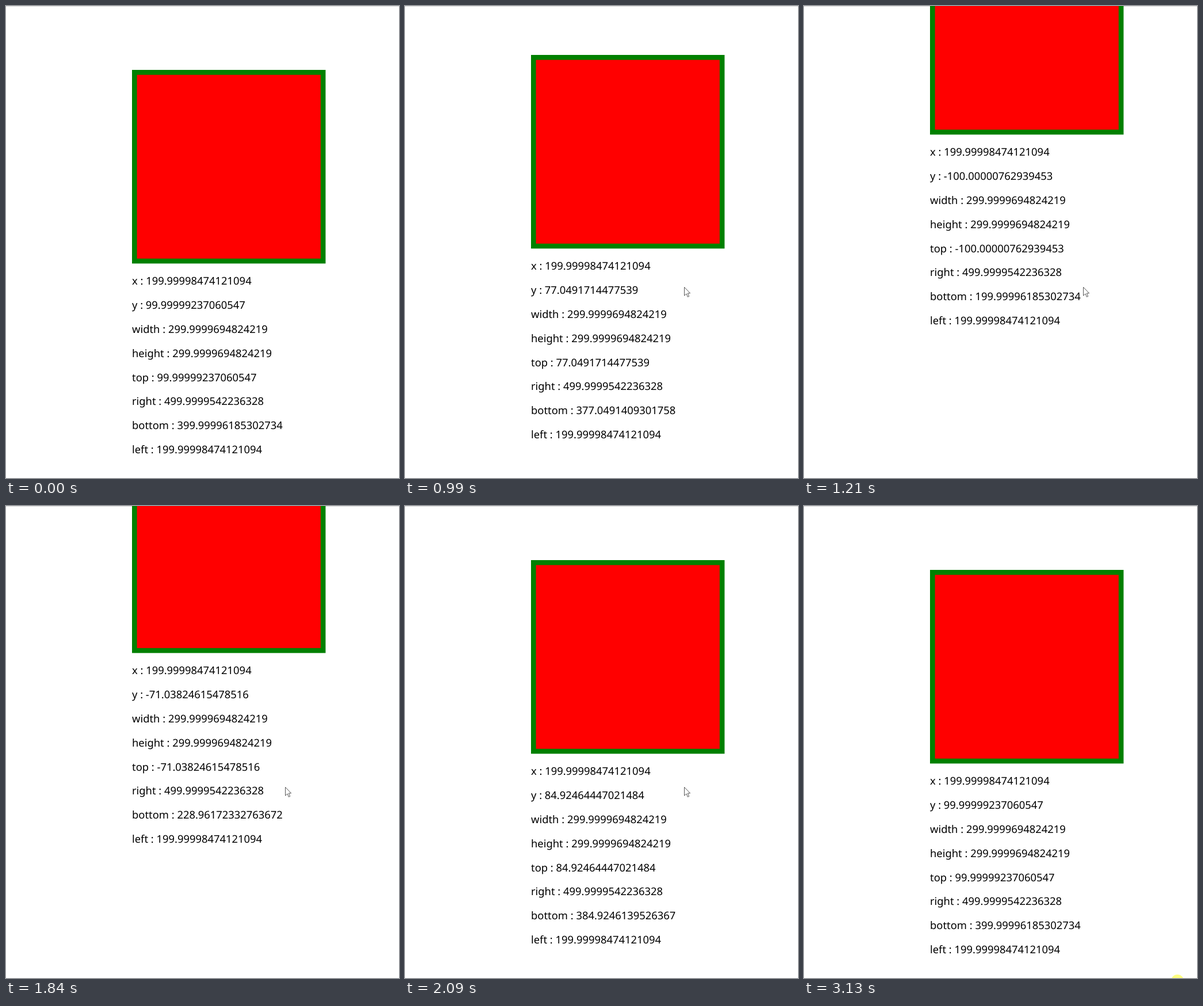
Recreate the animation shown at these times as an HTML page. Size 683x820 px, loop 3200 ms.

```html
<!DOCTYPE html>
<html lang="en">
<head>
<meta charset="utf-8">
<title>Bounding rectangle on scroll</title>
<style>
  html, body { margin: 0; width: 100%; height: 100%; overflow: hidden; background: #fff; }
  svg { display: block; width: 683px; height: 820px; }
  text { font: 18.36px "Noto Sans", "Open Sans", sans-serif; text-rendering: geometricPrecision; }
</style>
</head>
<body>
<svg viewBox="0 0 683 820">
  <rect width="683" height="1" fill="#d6d6d6"/>
  <g id="page">
    <rect x="219" width="336.4" height="336.4" fill="green"/>
    <rect x="227.6" y="8.6" width="319.2" height="319.2" fill="red"/>
  </g>
  <circle id="click" cx="649" cy="825" r="11" fill="#ffff80"/>
  <path id="cursor" d="M.5.5V15.2L4 11.9 6.3 17.4 8.6 16.4 6.3 11H10.6Z" fill="#fff" stroke="#444" stroke-width=".9"/>
</svg>
<script>
const LOOP = 3200, TICK = 110 / 3, SCALE = 1.12;
const SIZE = 299.9999694824219, LEFT = 199.99998474121094;
const TOP = 99.99999237060547, SCROLLED = TOP - 200;
const page = document.getElementById('page');
const cursor = document.getElementById('cursor');
const click = document.getElementById('click');

const labels = ['x', 'y', 'width', 'height', 'top', 'right', 'bottom', 'left'];
const lines = labels.map((label, i) => {
  const line = document.createElementNS('http://www.w3.org/2000/svg', 'text');
  line.setAttribute('x', 219);
  line.setAttribute('y', Math.round(373.4 + i * 41.8));
  return page.appendChild(line);
});

const progress = (n, from, to) => Math.min(1, Math.max(0, (n - from) / (to - from)));
const lerp = (a, b, p) => a + (b - a) * p;
const easeOut = (p, power) => 1 - (1 - p) ** power;
const bezier = (a, b, c, p) => lerp(lerp(a, b, p), lerp(b, c, p), p);
const move = (node, x, y) => node.setAttribute('transform', `translate(${Math.round(x)} ${Math.round(y)})`);

// Top of the box in page units: scrolled down, then back up with a soft stop
function boxTop(n) {
  const mid = 31.147539138793945, first = -71.03824615478516, slow = 38.25136184692383;
  if (n < 29) return lerp(TOP, mid, progress(n, 26, 29));
  if (n < 50) return lerp(mid, SCROLLED, progress(n, 29, 33));
  if (n < 54) return lerp(first, slow, progress(n, 50, 54));
  return n < 62 ? lerp(slow, TOP, easeOut(progress(n, 54, 62), 3)) : TOP;
}

// Pointer tip: curves in from below, settles, then leaves at the bottom right
function pointer(n) {
  if (n < 1) return [621, 900];
  if (n <= 16) {
    const p = progress(n, 1, 10);
    return [bezier(621, 432, 482, p), bezier(806, 428, 492, p)];
  }
  if (n <= 62) {
    const p = progress(n, 16, 18);
    return [lerp(482, 485, p), lerp(492, 488, p)];
  }
  const p = progress(n, 62.5, 78), drift = progress(n, 78, 82);
  return [lerp(485, 633, easeOut(p, 1.9)) + 7 * drift, lerp(488, 807, easeOut(p, 3.35)) + 23 * drift];
}

function draw(t) {
  const n = Math.floor((t + 7) / TICK);
  const y = Math.fround(boxTop(n));
  const values = [LEFT, y, SIZE, SIZE, y, LEFT + SIZE, y + SIZE, LEFT];
  lines.forEach((line, i) => { line.textContent = `${labels[i]} : ${values[i]}`; });
  move(page, 0, y * SCALE - 1);
  move(cursor, ...pointer(n));
  click.style.display = t >= 3130 ? '' : 'none';
}

const begin = performance.now();
function tick() {
  draw((performance.now() - begin) % LOOP);
  requestAnimationFrame(tick);
}
tick();
</script>
</body>
</html>
```
